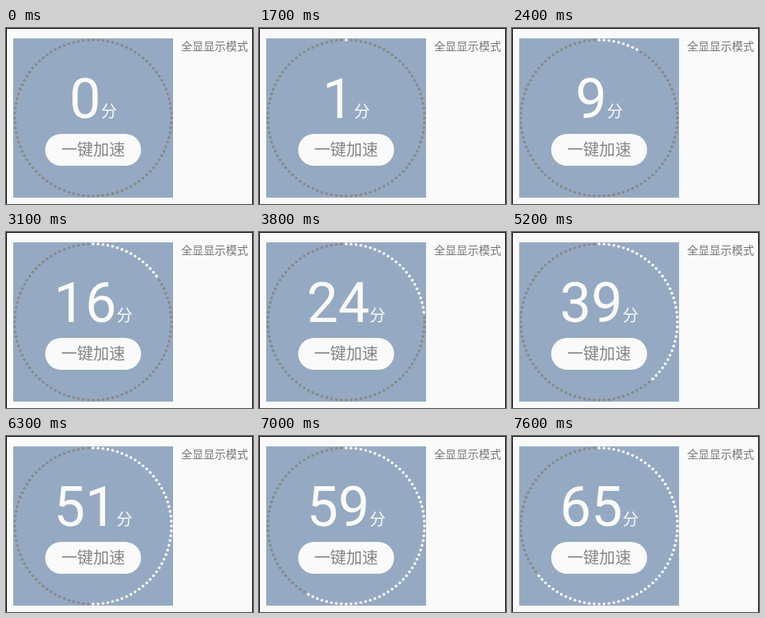
Animation of 309 by 221 pixels, one loop 8000 ms. Source, as an HTML page:

```html
<!DOCTYPE html>
<html lang="zh">
<head>
<meta charset="utf-8">
<style>
  html, body { margin: 0; width: 100%; height: 100%; overflow: hidden; background: #fafafa; }
  svg { display: block; width: 309px; height: 221px; font-family: Roboto, "Noto Sans CJK SC", "Noto Sans CJK", sans-serif; }
</style>
</head>
<body>
<svg viewBox="0 0 309 221">
  <path d="M.5 221V.5H308.5V221" fill="none" stroke="#000"/>
  <rect x="9" y="13" width="200" height="200" fill="#95a9c2"/>
  <g id="ring"></g>
  <text id="score" y="113" font-size="70" fill="#fafafa">0</text>
  <text id="unit" y="111.5" font-size="20" fill="#fafafa">分</text>
  <rect id="button" x="49" y="133" width="120" height="40" rx="20"/>
  <text x="69" y="159.5" font-size="20" fill="#848484">一键加速</text>
  <text x="219" y="28" font-size="14" fill="#757575">全显显示模式</text>
</svg>
<script>
const LOOP = 8000, STEP = 100, COUNT_START = 1700, COUNT_END = 7600;
const CENTER_X = 109, CENTER_Y = 113, RADIUS = 98, DOTS = 100;
const DIGIT_WIDTH = 39.3, UNIT_WIDTH = 20;
const PRESS_TIMES = [700, 7500];
const [ring, score, unit, button] =
  ['ring', 'score', 'unit', 'button'].map(id => document.getElementById(id));

const dots = Array.from({ length: DOTS }, (_, i) => {
  const angle = i / DOTS * 2 * Math.PI;
  const dot = document.createElementNS('http://www.w3.org/2000/svg', 'circle');
  dot.setAttribute('cx', CENTER_X + RADIUS * Math.sin(angle));
  dot.setAttribute('cy', CENTER_Y - RADIUS * Math.cos(angle));
  dot.setAttribute('r', 1.8);
  return ring.appendChild(dot);
});

function valueAt(time) {
  if (time < COUNT_START) return 0;
  const step = Math.floor((Math.min(time, COUNT_END) - COUNT_START) / STEP);
  return Math.floor(1.42 + 1.09 * step);
}

function draw(now) {
  const time = now % LOOP;
  const value = valueAt(time);
  const digits = String(value);
  const width = digits.length * DIGIT_WIDTH;
  const left = CENTER_X - (width + UNIT_WIDTH) / 2;
  const pressed = PRESS_TIMES.some(start => time >= start && time < start + STEP);

  score.textContent = digits;
  score.setAttribute('x', left);
  unit.setAttribute('x', left + width);
  button.setAttribute('fill', pressed ? '#d0d0d0' : '#fafafa');
  dots.forEach((dot, i) => dot.setAttribute('fill', i < value ? '#fafafa' : '#888'));
  requestAnimationFrame(draw);
}
draw(performance.now());
</script>
</body>
</html>
```
